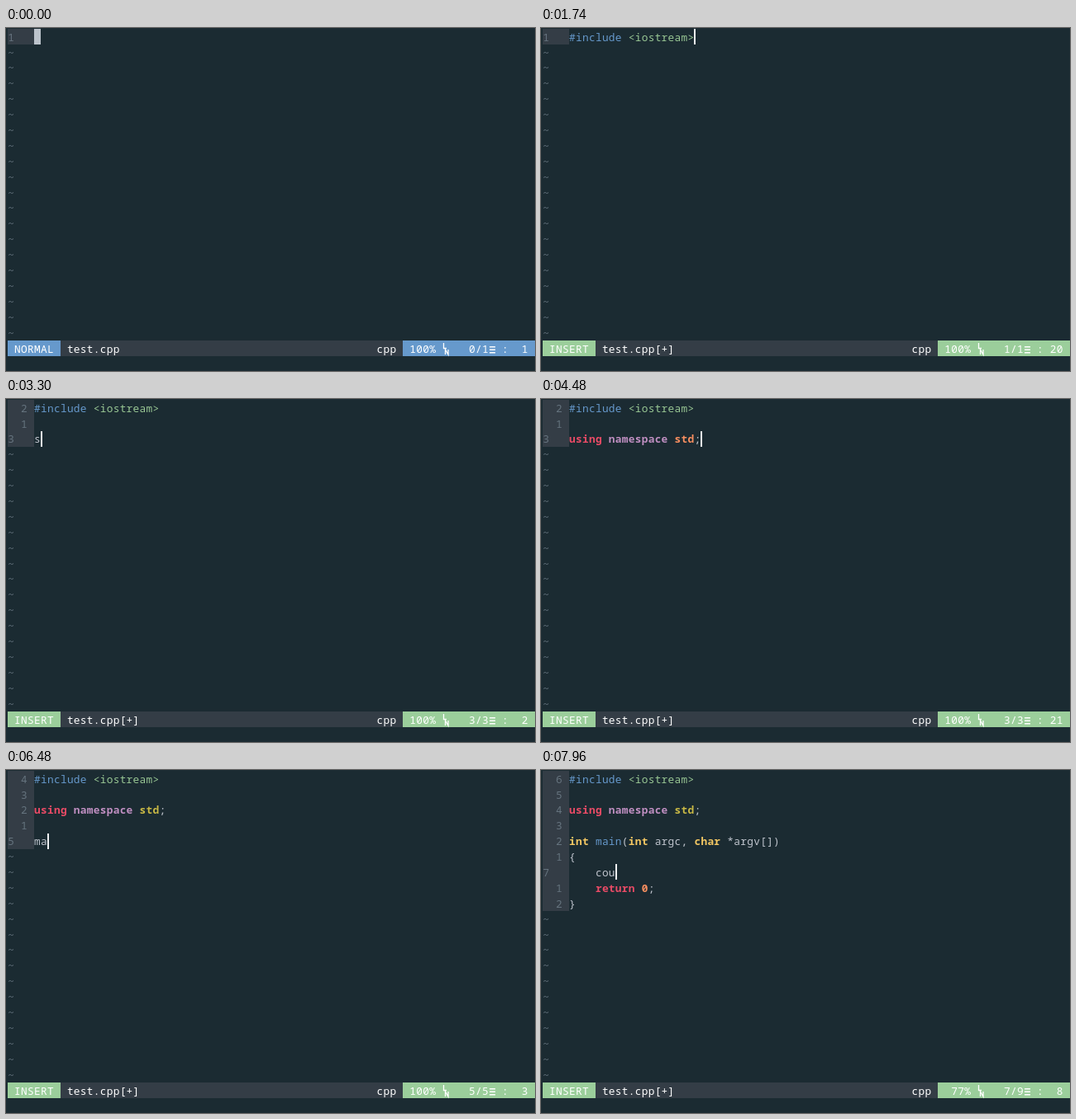
Write an HTML page with a canvas that moves like this. It is 640 px wide and 416 px high and loops after 8 s.

```html
<!DOCTYPE html>
<html lang="en">
<head>
<meta charset="utf-8">
<title>Editor session</title>
<style>
  html, body { margin: 0; width: 100%; height: 100%; overflow: hidden; background: #1b2b32; }
  canvas { display: block; width: 640px; height: 416px; }
</style>
</head>
<body>
<canvas id="stage"></canvas>
<script>
const LOOP = 8000;
const CELL = 7.97, LINE = 18.9, LEFT = 2, TOP = 1;
const GUTTER = 4, STATUS_ROW = 20;

const C = {
  bg: '#1b2b32', panel: '#343d46', select: '#4f5b66', dim: '#65737e',
  text: '#c0c5ce', white: '#ffffff', blue: '#6699cc', green: '#99c794',
  orange: '#f98f60', red: '#ea4b66', purple: '#c08fc2', yellow: '#f5c863', olive: '#c9b945'
};
const MODE_COLOR = { NORMAL: C.blue, INSERT: '#9bce9b', SELECT: '#fa8a62' };

const canvas = document.getElementById('stage');
const ctx = canvas.getContext('2d');
const scale = window.devicePixelRatio || 1;
canvas.width = 640 * scale;
canvas.height = 416 * scale;
ctx.scale(scale, scale);

// Build the session as a list of timed editor states.
const states = [];
let lines = [''], row = 0, mode = 'NORMAL', select = null;

function save(at, col = lines[row].length) {
  states.push({ at, lines: [...lines], row, col, mode, select });
}
function type(word, ...times) {
  times.forEach((at, i) => { lines[row] += word[i]; save(at); });
}
function newline(at) {
  lines.splice(++row, 0, '');
  save(at);
}
function expand(at, ...body) {
  lines.splice(row, 1, ...body);
  save(at);
}

save(0);
mode = 'INSERT';
save(250);
type('inc', 400, 520, 640);
mode = 'SELECT';
select = [10, 18];
lines[0] = '#include <iostream>';
save(810, 17);
mode = 'INSERT';
select = null;
save(1480);
newline(2360);
newline(2600);
type('std', 3240, 3400, 3540);
expand(3900, 'using namespace std;');
newline(5320);
newline(5520);
type('main', 6240, 6400, 6660, 6800);
lines.splice(row, 1, 'int main(int argc, char *argv[])', '{', '    ', '    return 0;', '}');
row += 2;
save(7120);
type('cou', 7560, 7720, 7880);

const X = col => LEFT + col * CELL;
const Y = line => TOP + line * LINE;

function box(col, line, width, color) {
  ctx.fillStyle = color;
  const x = Math.round(X(col)), y = Math.round(Y(line));
  ctx.fillRect(x, y, Math.round(X(col + width)) - x, Math.round(Y(line + 1)) - y);
}

// Each glyph sits in the middle of its terminal cell.
function write(str, col, line, color, weight = 500) {
  ctx.font = weight + ' 12.8px "Noto Sans Mono", "DejaVu Sans Mono", monospace';
  ctx.textAlign = 'center';
  ctx.fillStyle = color;
  const y = Math.round(Y(line) + 14.6);
  [...str].forEach((ch, i) => {
    if (ch !== ' ') ctx.fillText(ch, X(col + i + 0.5), y);
  });
}

function tokenStyle(token, line, count) {
  if (token === '#include') return [C.blue];
  if (token[0] === '<') return [C.green];
  if (token === 'using' || token === 'return') return [C.red, 600];
  if (token === 'namespace') return [C.purple, 600];
  if (token === 'int' || token === 'char') return [C.yellow, 600];
  if (token === '0') return [C.orange, 600];
  if (token === 'main' && line.includes('(')) return [C.blue];
  if (token === 'std' && line.includes('using')) return [count > 3 ? C.olive : C.orange, 600];
  return [C.text];
}

function drawCode(s) {
  s.lines.forEach((line, n) => {
    box(0, n, GUTTER, C.panel);
    if (n === s.row) write(String(n + 1), 0, n, C.dim);
    else write(String(Math.abs(n - s.row)), 2, n, C.dim);
    if (s.select && n === s.row) {
      box(GUTTER + s.select[0], n, s.select[1] - s.select[0], C.select);
    }
    for (const m of line.matchAll(/#?\w+|<\w+>|\S/g)) {
      write(m[0], GUTTER + m.index, n, ...tokenStyle(m[0], line, s.lines.length));
    }
  });
  for (let n = s.lines.length; n < STATUS_ROW; n++) write('~', 0, n, C.dim);
}

function drawCursor(s) {
  const col = GUTTER + s.col;
  if (s.mode === 'INSERT') {
    ctx.fillStyle = '#eef0f2';
    ctx.fillRect(Math.round(X(col)), Math.round(Y(s.row)), 2, 19);
    return;
  }
  box(col, s.row, 1, '#bcc3cb');
  write(s.lines[s.row][s.col] || ' ', col, s.row, C.bg);
}

function drawLineMark(x, y) {
  ctx.strokeStyle = C.white;
  ctx.lineWidth = 1.3;
  ctx.beginPath();
  ctx.moveTo(x + 0.5, y);
  ctx.lineTo(x + 0.5, y + 6.5);
  ctx.lineTo(x + 4, y + 6.5);
  ctx.moveTo(x + 2.5, y + 14);
  ctx.lineTo(x + 2.5, y + 8);
  ctx.lineTo(x + 6, y + 14);
  ctx.lineTo(x + 6, y + 8);
  ctx.stroke();
}

function drawStatus(s) {
  const color = MODE_COLOR[s.mode];
  const blank = s.lines.length === 1 && !s.lines[0];
  const total = s.lines.length;
  const percent = Math.floor((s.row + 1) / total * 100);
  const put = (str, col) => write(str, col, STATUS_ROW, C.white);

  box(0, STATUS_ROW, 81, C.panel);
  box(0, STATUS_ROW, 8, color);
  box(60, STATUS_ROW, 21, color);
  put(s.mode, 1);
  put('test.cpp' + (s.mode === 'NORMAL' ? '' : '[+]'), 9);
  put('cpp', 56);
  put(String(percent).padStart(3) + '%', 61);
  drawLineMark(529, 382);
  put((blank ? 0 : s.row + 1) + '/' + total, 70);
  ctx.fillStyle = C.white;
  for (let i = 0; i < 3; i++) ctx.fillRect(585, 386 + i * 3.5, 7, 1.5);
  put(':' + String(s.col + 1).padStart(3), 75);

  if (s.select) write(String(s.select[1] - s.select[0]), 69, STATUS_ROW + 1, C.text);
}

function frame(now) {
  const t = now % LOOP;
  const state = states.findLast(s => s.at <= t) || states[0];
  ctx.fillStyle = C.bg;
  ctx.fillRect(0, 0, 640, 416);
  drawCode(state);
  drawCursor(state);
  drawStatus(state);
  requestAnimationFrame(() => frame(performance.now()));
}
frame(performance.now());
</script>
</body>
</html>
```
